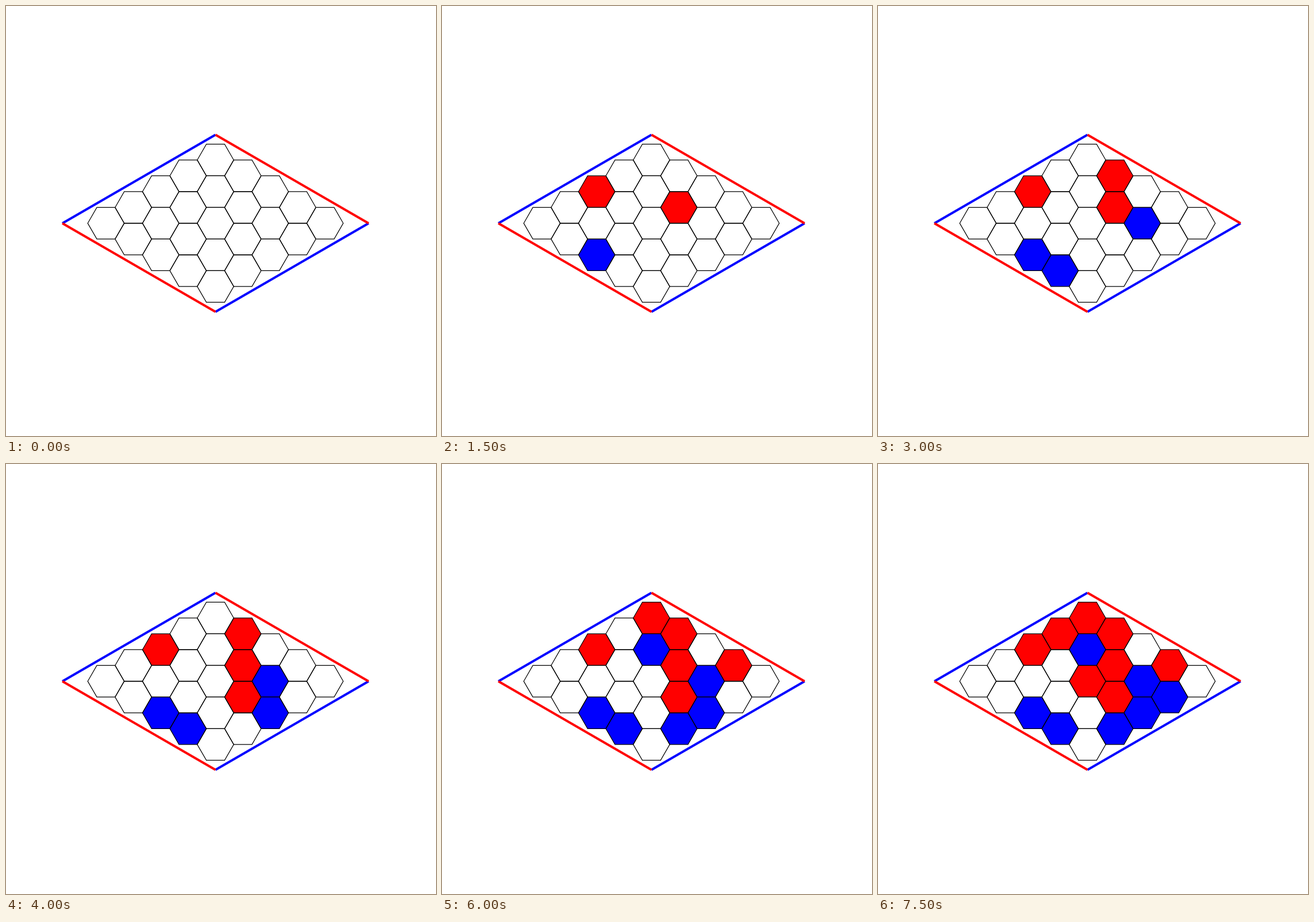
Recreate the animation shown at these times as an HTML page with a canvas. Size 748x748 px, loop 8000 ms.

```html
<!DOCTYPE html>
<html lang="en">
<head>
<meta charset="utf-8">
<title>Hex board</title>
<style>
  html, body { margin: 0; width: 100%; height: 100%; overflow: hidden; background: #fff; }
  canvas { display: block; }
</style>
</head>
<body>
<canvas id="board" width="748" height="748"></canvas>
<script>
const ctx = document.getElementById('board').getContext('2d');
const CX = 364.4, CY = 377.9;
const SIDE = 31.75, HALF = SIDE * Math.sqrt(3) / 2;
const RED = '#f00', BLUE = '#00f';
const LOOP = 8000, STEP = 500;

// Column and half-row offsets from the board centre; red and blue take turns.
const moves = [
  [-2, -2], [-2, 2], [1, -1], [-1, 3], [1, -3],
  [2, 0], [1, 1], [2, 2], [0, -4], [1, 3],
  [3, -1], [0, -2], [-1, -3], [3, 1], [0, 0]
];

const cells = [];
for (let a = 0; a < 5; a++)
  for (let b = 0; b < 5; b++) cells.push([a - b, a + b - 4]);

function hexPath([col, row]) {
  const x = CX + col * SIDE * 1.5, y = CY + row * HALF;
  ctx.beginPath();
  for (let i = 0; i < 6; i++) {
    const t = i * Math.PI / 3;
    ctx.lineTo(x + SIDE * Math.cos(t), y + SIDE * Math.sin(t));
  }
  ctx.closePath();
}

function edge(x1, y1, x2, y2, color) {
  ctx.strokeStyle = color;
  ctx.beginPath();
  ctx.moveTo(x1, y1);
  ctx.lineTo(x2, y2);
  ctx.stroke();
}

function drawBorder() {
  const w = 266.3, h = 154;
  ctx.lineWidth = 4;
  edge(CX - w, CY, CX, CY - h, BLUE);
  edge(CX, CY + h, CX + w, CY, BLUE);
  edge(CX - w, CY, CX, CY + h, RED);
  edge(CX, CY - h, CX + w, CY, RED);
}

function draw(count) {
  ctx.fillStyle = '#fff';
  ctx.fillRect(0, 0, 748, 748);
  drawBorder();
  moves.slice(0, count).forEach((cell, i) => {
    hexPath(cell);
    ctx.fillStyle = i % 2 ? BLUE : RED;
    ctx.fill();
  });
  ctx.strokeStyle = '#000';
  ctx.lineWidth = 1.2;
  for (const cell of cells) {
    hexPath(cell);
    ctx.stroke();
  }
}

const start = performance.now();
function tick() {
  const t = (performance.now() - start) % LOOP;
  draw(Math.floor(t / STEP));
  requestAnimationFrame(tick);
}
tick();
</script>
</body>
</html>
```
